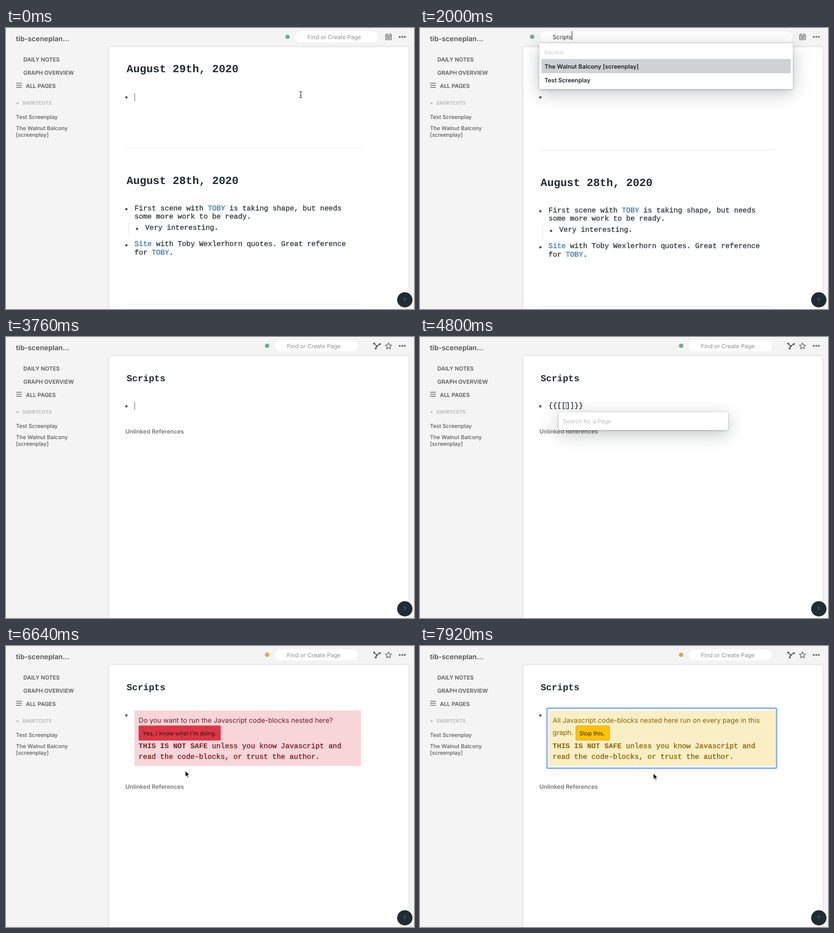
These frames come from a looping animation (800x553 px, 8000 ms). An HTML page with a canvas:

```html
<!DOCTYPE html>
<html lang="en">
<head>
<meta charset="utf-8">
<title>Notes</title>
<style>
html, body { margin: 0; width: 100%; height: 100%; overflow: hidden; background: #f4f4f4; }
canvas { display: block; }
</style>
</head>
<body>
<canvas id="stage" width="800" height="553"></canvas>
<script>
const LOOP = 8000, STEP = 80;
const ctx = document.getElementById('stage').getContext('2d');
ctx.textRendering = 'geometricPrecision';

const INK = '#2f353b', LINK = '#4a80b2', GREY = '#5a5a5a';
const sans = (size, weight = 400) => `${weight} ${size}px Inter, "Open Sans", sans-serif`;
const mono = (size, weight = 400) => `${weight} ${size}px "Liberation Mono", monospace`;
const BODY = 14.1;

// Drawing helpers
function text(s, x, y, font, color, thicken = 0) {
  ctx.font = font;
  ctx.fillStyle = ctx.strokeStyle = color;
  ctx.fillText(s, x, y);
  if (thicken) {
    ctx.lineWidth = thicken;
    ctx.strokeText(s, x, y);
  }
  return x + ctx.measureText(s).width;
}

// Parts between asterisks use the accent colour and weight.
function rich(s, x, y, color = INK, accent = LINK, weight = 400) {
  s.split('*').forEach((part, i) => {
    x = i % 2
      ? text(part, x, y, mono(BODY, weight), accent, weight > 400 ? 0 : .5)
      : text(part, x, y, mono(BODY), color, .35);
  });
}

function box(x, y, w, h, r, fill, stroke, width = 1) {
  ctx.beginPath();
  ctx.roundRect(x, y, w, h, r);
  if (fill) { ctx.fillStyle = fill; ctx.fill(); }
  if (stroke) { ctx.strokeStyle = stroke; ctx.lineWidth = width; ctx.stroke(); }
}

function disc(x, y, r, color) {
  ctx.beginPath();
  ctx.arc(x, y, r, 0, 7);
  ctx.fillStyle = color;
  ctx.fill();
}

function path(d, x, y, fill, stroke, width = 1) {
  const p = new Path2D(d);
  ctx.save();
  ctx.translate(x, y);
  ctx.lineJoin = 'round';
  if (fill) { ctx.fillStyle = fill; ctx.fill(p); }
  if (stroke) { ctx.strokeStyle = stroke; ctx.lineWidth = width; ctx.stroke(p); }
  ctx.restore();
}

function popup(x, y, w, h) {
  ctx.save();
  ctx.shadowColor = 'rgba(16,22,26,.26)';
  ctx.shadowBlur = 34;
  ctx.shadowOffsetY = 8;
  box(x, y, w, h, 2, '#fff');
  ctx.shadowBlur = 4;
  ctx.shadowOffsetY = 1;
  box(x, y, w, h, 2, '#fff');
  ctx.restore();
}

const bullet = (x, y) => disc(x, y, 2.3, '#4a4f55');
const caret = (x, y, h, color = '#666') => box(x, y, 1, h, 0, color);
const rule = y => box(236, y, 460, 1, 0, '#e6e6e6');
const between = (t, a, b) => t >= a && t < b;
const ease = (t, a, b) => {
  const p = Math.min(1, Math.max(0, (t - a) / (b - a)));
  return p * p * (3 - 2 * p);
};
const typed = (s, times, t) => s.slice(0, times.filter(at => t >= at).length);

// Fixed surroundings
function sidebar() {
  text('tib-sceneplan...', 19.5, 26, sans(13.7, 600), '#555');
  text('DAILY NOTES', 34, 65.5, sans(10.9, 600), GREY);
  text('GRAPH OVERVIEW', 34, 92, sans(10.9, 600), GREY);
  text('ALL PAGES', 39, 118, sans(10.9, 600), GREY);
  for (const y of [108, 112, 116]) box(20, y, 11, 1.3, 0, GREY);
  path(star(3), 22.5, 148, '#b8b8b8');
  text('SHORTCUTS', 32, 151, mono(10.7, 700), '#bdbdbd');
  text('Test Screenplay', 19.5, 179, sans(10.7, 500), GREY);
  text('The Walnut Balcony', 19.5, 201, sans(10.7, 500), GREY);
  text('[screenplay]', 19.5, 213.5, sans(10.7, 500), GREY);
}

function star(r) {
  let d = '';
  for (let i = 0; i < 10; i++) {
    const a = i * Math.PI / 5, k = i % 2 ? r * .45 : r;
    d += `${i ? 'L' : 'M'}${k * Math.sin(a)},${-k * Math.cos(a)}`;
  }
  return d + 'Z';
}

function paper() {
  ctx.save();
  ctx.shadowColor = 'rgba(0,0,0,.16)';
  ctx.shadowBlur = 4;
  box(202.5, 37.5, 587, 530, 3, '#fff');
  ctx.restore();
}

function help() {
  disc(782, 535, 15, '#202b33');
  text('?', 778.8, 538.5, sans(11.2), '#66727c');
}

// Top bar
function toolbar(t, onScripts) {
  const right = onScripts ? 691 : 731;
  const grow = onScripts ? 0 : ease(t, 960, 1240);
  const left = onScripts ? 234 + 292 * ease(t, 2476, 2876) : 566 - 332 * grow;
  const busy = between(t, 2400, 3280) || between(t, 4000, 4400) || t >= 6400;
  disc(left - 14, 17.3, 4.3, busy ? '#d6ab55' : '#6cb092');
  box(left, 6, right - left, 23, 11.5, '#fff', '#e9e9e9', .7);

  const query = onScripts ? '' : typed('Scripts', [1440, 1520, 1600, 1680, 1760, 1920, 2000], t);
  const end = query
    ? text(query, left + 26, 21.5, sans(11.4), '#333')
    : text('Find or Create Page', left + 25, 21.5, sans(11.2), '#8f8f8f');
  if (!onScripts && t >= 960) caret(query ? end : left + 25, 6, 18, '#222');

  if (onScripts) {
    path('M-5-4L0 1L6-3M0 1L-2 6', 727, 17, null, '#5c5c5c', 1.6);
    for (const [x, y] of [[722, 13], [733, 14], [727, 18], [725, 22.5]]) disc(x, y, 2, '#5c5c5c');
    path(star(6.5), 750, 18, null, '#5c5c5c', 1.2);
  } else {
    path('M-5.5-4h11v10h-11zM-5.5-1.5h11', 750, 17, null, '#5c5c5c', 1.2);
    path('M-3.5 .8h7M-3.5 3.6h7M-3-6v2M3-6v2', 750, 17, null, '#666', 1.5);
  }
  for (const x of [772, 777, 782]) disc(x, 17.5, 1.8, '#5c5c5c');
}

function recentList() {
  popup(234, 30, 497, 90);
  text('Recent', 244, 52, sans(11.2), '#cfcfcf');
  box(238, 61, 489, 28, 0, '#ced2d5');
  text('The Walnut Balcony [screenplay]', 244, 79.5, sans(11.6, 600), '#1d2227');
  text('Test Screenplay', 244, 107, sans(11.6, 600), '#1d2227');
}

// Pages
function dailyNotes(t) {
  const editing = t < 960;
  text('August 29th, 2020', 236.5, 87, mono(21.5, 700), '#202b33');
  bullet(236, 136.5);
  if (editing) caret(252, 128, 16);
  ctx.save();
  ctx.translate(0, editing ? 0 : 4);
  rule(236);
  text('August 28th, 2020', 236.5, 307, mono(21.5, 700), '#202b33');
  bullet(236, 356.5);
  rich('First scene with *TOBY* is taking shape, but needs', 252, 358.5);
  rich('some more work to be ready.', 252, 375);
  box(239.5, 384, 1, 26, 0, '#e4e4e4');
  bullet(257, 395.2);
  rich('Very interesting.', 273, 397.2);
  bullet(236, 427.5);
  rich('*Site* with Toby Wexlerhorn quotes. Great reference', 252, 429.2);
  rich('for *TOBY*.', 252, 445.5);
  rule(543);
  ctx.restore();
}

function scriptsPage(t) {
  const alert = t >= 6400;
  text('Scripts', 236.5, 87, mono(18.1, 700), '#202b33');
  bullet(236, 136.5);
  text('Unlinked References', 234, alert ? 280.5 : 189.5, sans(11.5, 600), '#757575');
  if (alert) warning(t >= 7440);
  else if (t < 3200) rich('Click here to start writing', 252, 141, '#b9bcbf');
  else editor(t);
}

function editor(t) {
  const open = typed('{{[[', [3920, 4000, 4160, 4320], t);
  const close = [...open].reverse().map(c => c === '{' ? '}' : ']').join('');
  const name = typed('roam/js', [4960, 5040, 5200, 5360, 5520, 5760, 5920], t);
  rich(open + name + close, 252, 139);
  ctx.font = mono(BODY);
  caret(252 + ctx.measureText(open + name).width, 128, 15);
  if (between(t, 4400, 6080)) {
    popup(272, 148, 332, 35);
    const found = t >= 5040;
    text(found ? 'roam/css' : 'Search for a Page', 280.5, 170, sans(11.2), found ? '#2b2f33' : '#bfbfbf');
  }
}

function warning(running) {
  const color = running ? '#856404' : '#721c24';
  const say = (s, y) => text(s, 260, y, sans(13.35), color);
  box(252, 127, 444, 109, 0, running ? '#faeec4' : '#f8d5d8');
  if (running) {
    box(249, 122.5, 450, 118, 2, null, '#86b2f0', 3);
    say('All Javascript code-blocks nested here run on every page in this', 151);
    say('graph.', 175);
    box(305.5, 157, 66, 28.5, 2, '#ffc107', '#d9a514');
    text('Stop this.', 312.5, 176, sans(11.2), '#222');
  } else {
    say('Do you want to run the Javascript code-blocks nested here?', 151);
    box(260, 156.5, 161, 29.5, 2, '#dc3545');
    text("Yes, I know what I'm doing.", 268.5, 176, sans(11.2), '#2a1618');
  }
  rich('*THIS IS NOT SAFE* unless you know Javascript and', 260, 201, color, color, 700);
  rich('read the code-blocks, or trust the author.', 260, 221.5, color);
}

// Pointer: time, x, y
const ROUTE = [
  [0, 578, 131], [80, 578, 131], [880, 620, 18], [2080, 620, 18], [2680, 347, 49], [2760, 347, 49],
  [3160, 330, 137], [6080, 330, 137], [6400, 352, 252], [6640, 352, 252],
  [7200, 345, 172], [7440, 345, 172], [7880, 458, 257], [LOOP, 458, 257]
];

function pointer(t) {
  // Hidden while typing
  if (between(t, 1440, 2080) || between(t, 3520, 6080)) return;
  const i = ROUTE.findIndex(k => k[0] > t);
  const [t0, x0, y0] = ROUTE[i - 1], [t1, x1, y1] = ROUTE[i];
  const p = ease(t, t0, t1), x = x0 + (x1 - x0) * p, y = y0 + (y1 - y0) * p;
  const overButton = t >= 6400 && between(y, 156, 186);
  if (overButton || between(t, 2480, 2880)) {
    path('M-3 1V-5.5Q-3-7-1.8-7T-.5-5.5V-1Q1-2.2 2-.6Q3.6-1.4 4.2 0Q5.8-.4 5.8 1.4V3L4.5 7H-2L-5.2 2.2Q-6 .6-4.6 .3T-3 1Z',
      x, y, '#fff', '#222', 1.1);
  } else if (t < 3520 || (t < 6400 && y < 150)) {
    path('M-3-6Q0-6 0-4.5Q0-6 3-6M0-4.5V4.5M-3 6Q0 6 0 4.5Q0 6 3 6M-1.5 1.5H1.5', x, y, null, '#333', 1.1);
  } else {
    path('M0 0V12L2.8 9.5L4.8 14L6.7 13.2L4.8 8.8H8.5Z', x - .5, y - 6.5, '#111', '#fff', 1);
  }
}

function draw(now) {
  const t = Math.floor(now % LOOP / STEP) * STEP;
  const onScripts = t >= 2400;
  ctx.fillStyle = '#f4f4f4';
  ctx.fillRect(0, 0, 800, 553);
  sidebar();
  paper();
  if (onScripts) scriptsPage(t); else dailyNotes(t);
  toolbar(t, onScripts);
  if (between(t, 1200, 2400)) recentList();
  help();
  pointer(t);
  requestAnimationFrame(() => draw(performance.now()));
}
draw(performance.now());
</script>
</body>
</html>
```
